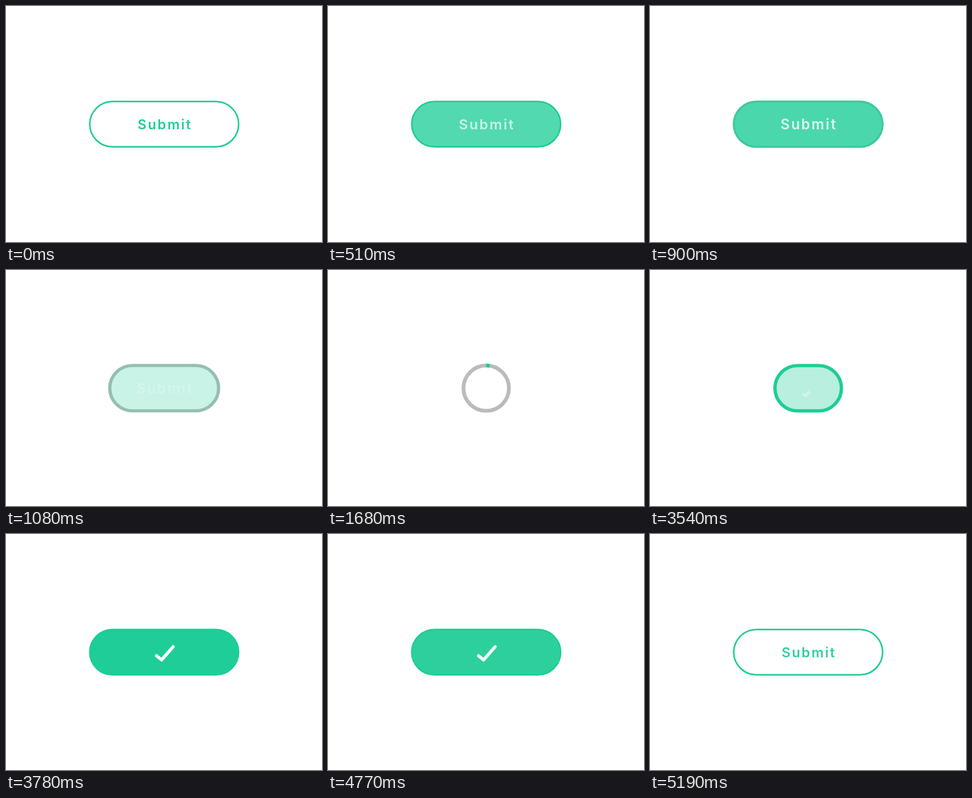
Recreate the animation shown at these times as an HTML page. Size 500 by 375 pixels, loop 5220 ms.

```html
<!DOCTYPE html>
<html lang="en">
<head>
<meta charset="utf-8">
<title>Submit button</title>
<style>
  html, body { margin: 0; width: 100%; height: 100%; overflow: hidden; background: #fff; }
  svg { display: block; width: 100vw; height: 100vh; }
  text { font: 600 21.5px Inter, "Open Sans", sans-serif; letter-spacing: 2.2px; text-anchor: middle; }
</style>
</head>
<body>
<svg viewBox="0 0 500 375">
  <g transform="translate(250.3 187.8)">
    <rect id="pill" y="-36" height="72" rx="36" fill="#1ecd97"/>
    <circle id="arc" r="36" fill="none" stroke="#1ecd97" stroke-width="6" pathLength="1" transform="rotate(-90)"/>
    <text id="label" x="1.1" y="8">Submit</text>
    <polyline id="check" fill="none" stroke="#fff" stroke-width="5" stroke-linecap="round" stroke-linejoin="round"/>
  </g>
</svg>
<script>
const LOOP = 5220, FRAME = 30;
const GREEN = [30, 205, 151], GRAY = [187, 187, 187], WHITE = [255, 255, 255];
const WIDE = 235.6, ROUND = 72, THIN = 2.5, THICK = 6;
const TIP = [-12.2, 5.7], BEND = [-4.1, 12.2], END = [14.2, -8.7];

const [pill, arc, label, check] =
  ["pill", "arc", "label", "check"].map(id => document.getElementById(id));

const mix = (a, b, k) => a + (b - a) * k;
const mixAll = (a, b, k) => a.map((v, i) => mix(v, b[i], k));
const rgb = c => `rgb(${c.map(Math.round)})`;
const span = (t, from, to) => Math.min(1, Math.max(0, (t - from) / (to - from)));
const smooth = k => k * k * (3 - 2 * k);
const set = (el, attrs) => {
  for (const name in attrs) el.setAttribute(name, attrs[name]);
};

// Cubic bezier easing with handles (x1, 0) and (x2, 1)
function ease(x, x1, x2) {
  let lo = 0, hi = 1;
  for (let i = 0; i < 24; i++) {
    const u = (lo + hi) / 2, v = 1 - u;
    if (3 * v * v * u * x1 + 3 * v * u * u * x2 + u * u * u < x) lo = u;
    else hi = u;
  }
  return smooth(lo);
}

function draw(t) {
  const hover = smooth(span(t, 285, 615));
  const press = smooth(span(t, 765, 1230));
  const shrink = smooth(span(t, 940, 1270));
  const load = ease(span(t, 1300, 3300), 0.8, 0.12);
  const grow = smooth(span(t, 3440, 3785));
  const done = span(t, 3430, 3780);
  const reset = span(t, 4740, 5190);
  const back = span(t, 4740, 5220);
  const finished = t >= 3435;

  const width = mix(WIDE, ROUND, shrink - grow);
  set(pill, {
    x: -width / 2,
    width,
    stroke: rgb(finished ? GREEN : mixAll(GREEN, GRAY, press)),
    "stroke-width": mix(THIN, THICK, press - grow),
    "fill-opacity": finished ? done * (1 - reset) : hover * (1 - press)
  });

  set(arc, {
    "stroke-dasharray": `${load} 2`,
    visibility: load > 0 && !finished ? "visible" : "hidden"
  });

  const returning = t >= 4740;
  set(label, {
    fill: rgb(returning ? GREEN : mixAll(GREEN, WHITE, hover)),
    opacity: returning ? back : 1 - press,
    transform: `scale(${returning ? 1 : 1 + 0.04 * hover})`
  });

  const points = [
    mixAll(BEND, TIP, Math.min(1, done * 1.2)),
    BEND,
    mixAll(BEND, END, mix(done, smooth(done), 0.6))
  ];
  set(check, { points: points.join(" "), opacity: done * (1 - reset) });
}

const start = performance.now();
function tick() {
  const t = (performance.now() - start) % LOOP;
  draw(Math.floor(t / FRAME) * FRAME);
  requestAnimationFrame(tick);
}
tick();
</script>
</body>
</html>
```
